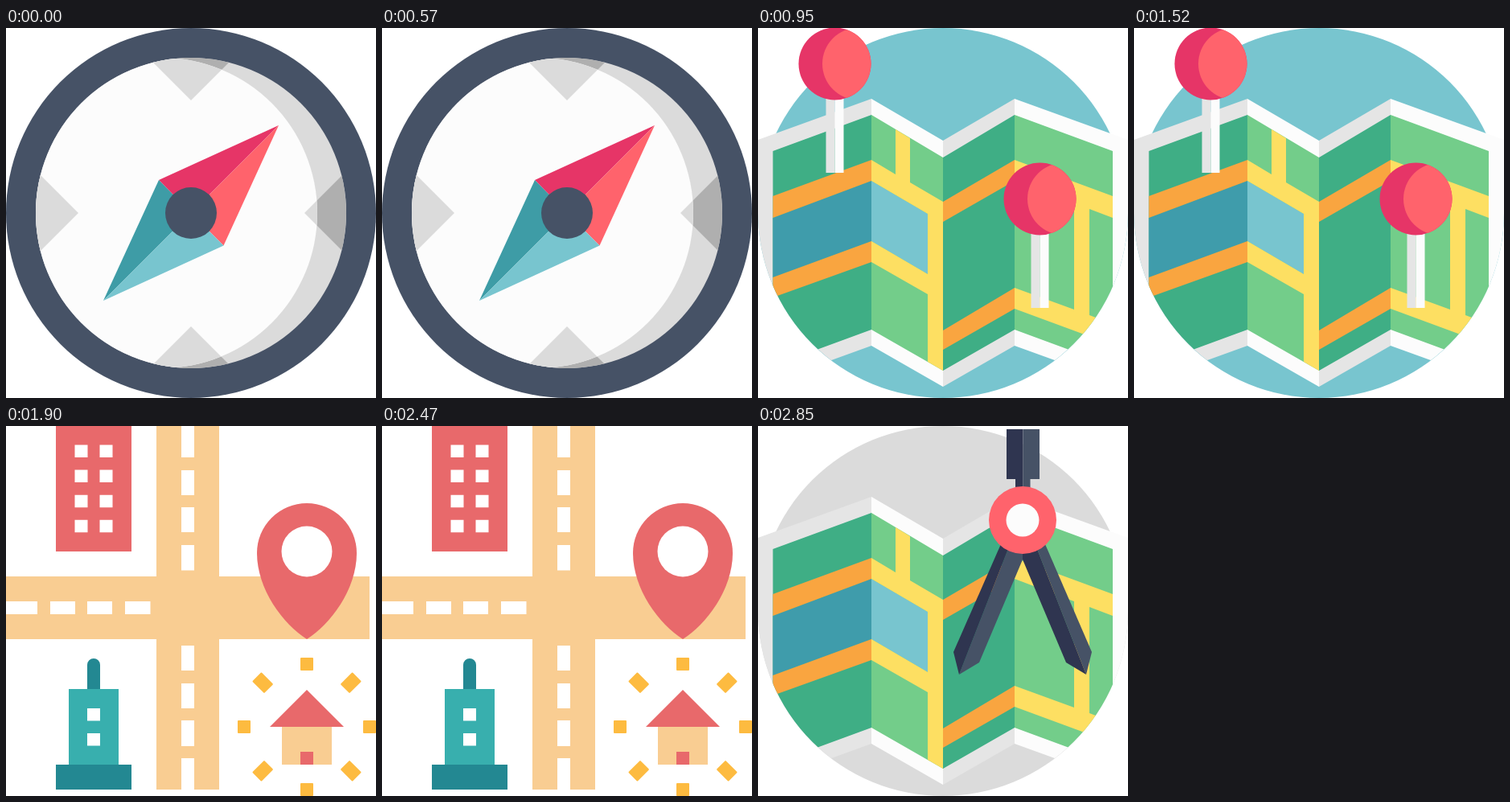
These frames come from a looping animation (460x460 px, 3800 ms). An HTML page:

```html
<!DOCTYPE html>
<html lang="en">
<head>
<meta charset="utf-8">
<title>Navigation icons</title>
<style>
  html, body { margin: 0; width: 100%; height: 100%; overflow: hidden; background: #fff; }
  svg { display: block; width: 100vw; height: 100vh; }
  .scene { visibility: hidden; animation: show 3800ms step-end infinite; }
  .scene:nth-of-type(1) { animation-delay: -3800ms; }
  .scene:nth-of-type(2) { animation-delay: -2850ms; }
  .scene:nth-of-type(3) { animation-delay: -1900ms; }
  .scene:nth-of-type(4) { animation-delay: -950ms; }
  @keyframes show {
    0% { visibility: visible; }
    25%, 100% { visibility: hidden; }
  }
  .navy { fill: #465266; }
  .ink { fill: #2f3550; }
  .paper { fill: #fcfcfc; }
  .fold { fill: #e5e5e5; }
  .grey { fill: #dbdbdb; }
  .crimson { fill: #e63567; }
  .coral { fill: #ff636c; }
  .sea { fill: #3e9ca6; }
  .sky { fill: #78c5cf; }
  .green { fill: #3fae85; }
  .lime { fill: #73cd8a; }
  .orange { fill: #f9a540; }
  .yellow { fill: #fddf62; }
  .sand { fill: #f9cd92; }
  .red { fill: #e8696b; }
  .teal { fill: #38afae; }
  .deep { fill: #238892; }
  .sun { fill: #fdbb40; }
  .white { fill: #fff; }
  .dash { fill: none; stroke: #fff; stroke-width: 16; }
</style>
</head>
<body>
<svg viewBox="0 0 460 460">
  <defs>
    <clipPath id="dial"><circle cx="230" cy="230" r="193"/></clipPath>
    <clipPath id="lit"><circle cx="194" cy="230" r="193"/></clipPath>
    <clipPath id="sheet"><path d="M0 0H460V230A230 230 0 0 1 0 230Z"/></clipPath>
    <clipPath id="ball"><circle r="45"/></clipPath>

    <path id="marks" d="M230 90L170 30H290ZM230 371L290 431H170ZM90 230L30 290V170ZM371 230L431 170V290Z"/>

    <g id="map" clip-path="url(#sheet)">
      <path class="fold" d="M0 139L141 88V395L0 446ZM230 140L319 88V395L230 446Z"/>
      <path class="paper" d="M141 88L230 140V446L141 395ZM319 88L460 139V446L319 395Z"/>
      <path class="green" d="M18.500 153L141 108V375L18.500 420ZM230 161L319 108V375L230 426Z"/>
      <path class="lime" d="M141 108L230 161V426L141 375ZM319 108L441 153V420L319 375Z"/>
      <path fill="#3f9cab" d="M18.500 236L141 190V265L18.500 310Z"/>
      <path class="orange" d="M18.500 209L141 164V190L18.500 236ZM18.500 310L141 265V291L18.500 335ZM230 216L319 164V190L230 241ZM230 376L319 323V349L230 400Z"/>
      <path class="sky" d="M141 190L211 231V306L141 265Z"/>
      <path class="yellow" d="M171 126L189 137V192L230 216V426L211 415V331L141 291V265L211 306V231L141 190V164L171 182Z"/>
      <path class="yellow" d="M319 164L441 209V236L412 225V357L441 368V394L319 349V323L393 350V218L319 190Z"/>
    </g>

    <g id="pin">
      <path class="fold" d="M-11 40H0V135.500H-11Z"/>
      <path class="paper" d="M0 40H11V135.500H0Z"/>
      <circle class="crimson" r="45"/>
      <circle class="coral" cx="29.500" r="45" clip-path="url(#ball)"/>
    </g>

    <g id="rays" class="sun">
      <rect x="-8" y="-86" width="16" height="16" rx="1"/>
      <rect x="-8" y="-88" width="16" height="21" rx="1" transform="rotate(45)"/>
    </g>
  </defs>

  <!-- compass -->
  <g class="scene">
    <circle class="navy" cx="230" cy="230" r="230"/>
    <g clip-path="url(#dial)">
      <path class="grey" d="M30 30H430V430H30Z"/>
      <use href="#marks" fill="#afafaf"/>
      <g clip-path="url(#lit)">
        <path class="paper" d="M0 30H430V430H0Z"/>
        <use href="#marks" class="grey"/>
      </g>
    </g>
    <path class="crimson" d="M339 121L190 189L230 230Z"/>
    <path class="coral" d="M339 121L270.500 270.500L230 230Z"/>
    <path class="sea" d="M121 339L190 189L230 230Z"/>
    <path class="sky" d="M121 339L270.500 270.500L230 230Z"/>
    <circle class="navy" cx="230" cy="230" r="32"/>
  </g>

  <!-- map with pins -->
  <g class="scene">
    <circle class="sky" cx="230" cy="230" r="230"/>
    <use href="#map"/>
    <use href="#pin" x="95.500" y="44.500"/>
    <use href="#pin" x="350.500" y="212.500"/>
  </g>

  <!-- town -->
  <g class="scene">
    <path class="sand" d="M187 0H265V187H452V265H265V452H187V265H0V187H187Z"/>
    <path class="dash" d="M226 0V39M226 55V86M226 101V132M226 148V179.500M226 273V304M226 320V351M226 366V398M226 413V452M0 226H39M55 226H86M101 226H132M148 226H179.500"/>
    <path class="red" d="M62 0H156V156H62Z"/>
    <path class="dash" stroke-dasharray="15.500 15.600" d="M93.500 23.500V133M124.500 23.500V133"/>
    <path class="deep" d="M101 330V297A8 8 0 0 1 117 297V330ZM62 421H156V452H62Z"/>
    <path class="teal" d="M78 327H140V421H78Z"/>
    <path class="dash" d="M109 351V366.500M109 382V397.500"/>
    <path class="red" d="M374 265C345 247 312 203 312 158A62 62 0 0 1 436 158C436 203 403 247 374 265Z"/>
    <circle class="white" cx="374" cy="156" r="31.500"/>
    <path class="sand" d="M343 374H405V421H343Z"/>
    <path class="red" d="M374 328L420 374H328ZM366 405H382V421H366Z"/>
    <g transform="translate(374 374)">
      <use href="#rays"/>
      <use href="#rays" transform="rotate(90)"/>
      <use href="#rays" transform="rotate(180)"/>
      <use href="#rays" transform="rotate(270)"/>
    </g>
  </g>

  <!-- map with dividers -->
  <g class="scene">
    <circle class="grey" cx="230" cy="230" r="230"/>
    <use href="#map"/>
    <path class="ink" d="M309 4H329.500V66H309ZM320 66H329.500V80H320Z"/>
    <path class="navy" d="M329.500 4H350V66H329.500ZM329.500 66H338.500V80H329.500Z"/>
    <path class="navy" d="M316 140H329V166L275 294L250 309Z"/>
    <path class="ink" d="M305 140H316L250 309L243 281Z"/>
    <path class="navy" d="M342 140H354L415 281L408 309Z"/>
    <path class="ink" d="M329 140H342L408 309L383 294L329 166Z"/>
    <circle class="coral" cx="329" cy="117" r="42"/>
    <circle class="paper" cx="329" cy="117" r="20.500"/>
  </g>
</svg>
</body>
</html>
```
